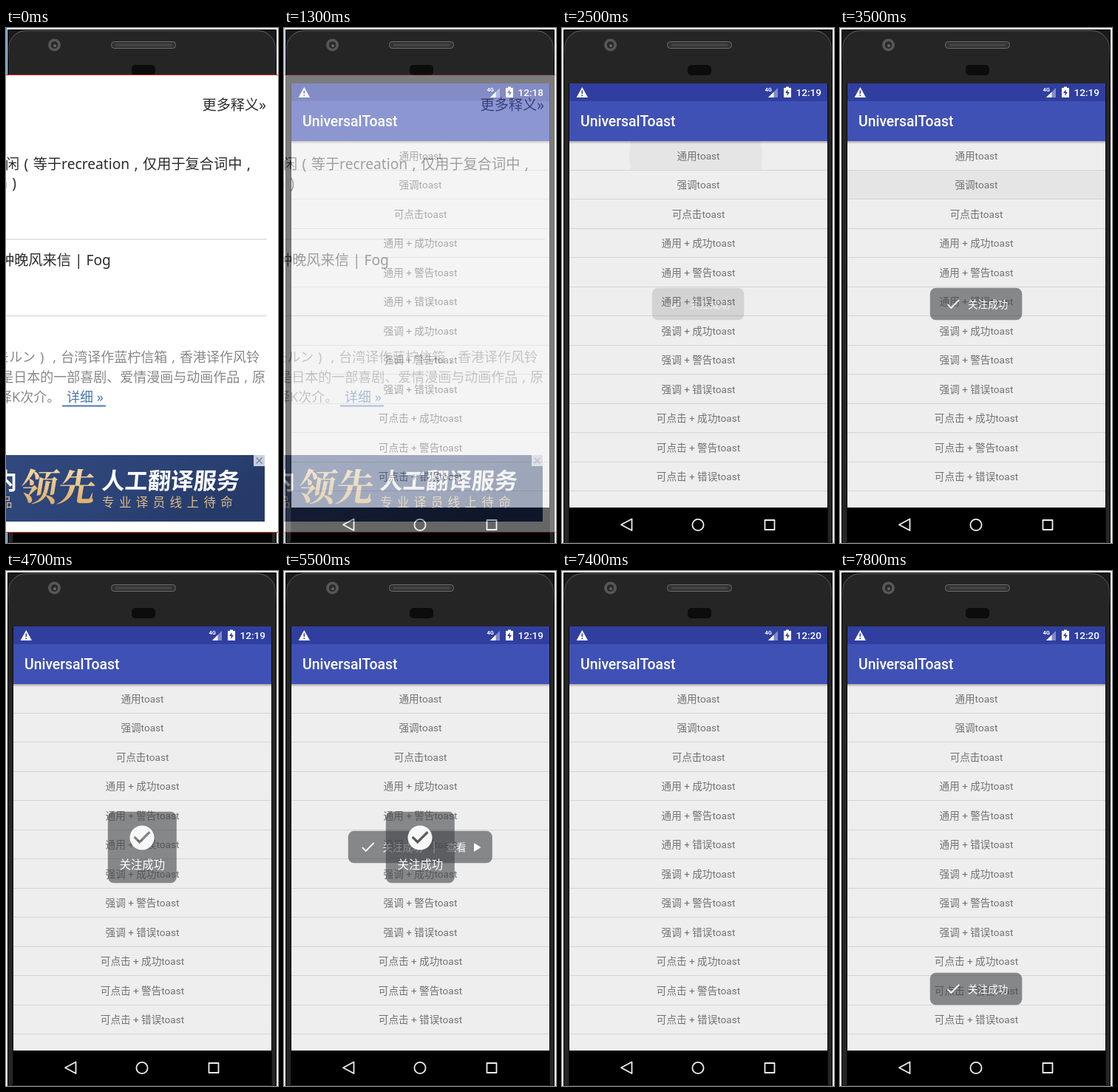
Write an HTML page that moves like this. It is 368x697 px and loops after 8 s.

```html
<!DOCTYPE html>
<html lang="zh-CN">
<head>
<meta charset="utf-8">
<title>UniversalToast</title>
<style>
  html, body { margin: 0; width: 100%; height: 100%; overflow: hidden; background: #f2f2f2; }
  svg { display: block; width: 368px; height: 697px; font: 13.6px Roboto, "Noto Sans CJK SC", "Noto Sans CJK", sans-serif; }
  text { white-space: pre; }
  .title { font-size: 19.4px; font-weight: 500; }
  .clock { font-weight: 500; text-anchor: end; }
  .network { font-size: 7.5px; font-weight: 700; }
  .large { font-size: 15.4px; }
  #rows { fill: #727272; text-anchor: middle; }
  .toast { fill: #fff; }
  .panel { fill: #424346; fill-opacity: .6; }
  .page { font: 19.2px "Noto Sans", "Noto Sans CJK SC", "Noto Sans CJK", sans-serif; fill: #2b2b2b; }
  .note { font-size: 18px; fill: #888; }
  .link { fill: #4878b4; }
  .end { text-anchor: end; }
  .banner { fill: #fff; font-weight: 700; font-size: 31px; }
  .gold { fill: #dcbc88; font-size: 16.5px; font-weight: 500; letter-spacing: 6.4px; }
  .brush { font: 900 51px "Noto Serif CJK SC", "Noto Sans CJK SC", "Noto Sans CJK", serif; }
</style>
</head>
<body>
<svg viewBox="0 0 368 697">
  <defs>
    <linearGradient id="navy" x2="1" y2=".4">
      <stop stop-color="#31497f"/><stop offset=".6" stop-color="#2c4377"/><stop offset="1" stop-color="#253a68"/>
    </linearGradient>
    <linearGradient id="gold" x2="0" y2="1">
      <stop stop-color="#fbe6b8"/><stop offset="1" stop-color="#d9a55c"/>
    </linearGradient>
    <linearGradient id="shade" x2="0" y2="1">
      <stop stop-opacity=".3"/><stop offset="1" stop-opacity="0"/>
    </linearGradient>
    <linearGradient id="rim" x2="0" y2=".06">
      <stop stop-color="#666"/><stop offset="1" stop-color="#2a2929"/>
    </linearGradient>
    <clipPath id="firstRow"><rect x="10" y="153" width="349" height="39"/></clipPath>
    <path id="check" d="M9 16.17 4.83 12l-1.42 1.41L9 19 21 7l-1.41-1.41z"/>
    <g id="simpleToast">
      <rect class="panel" x="121.8" y="351.8" width="124.500" height="43.500" rx="8"/>
      <use href="#check" transform="translate(141.6 361.8) scale(.97)"/>
      <text x="173" y="379">关注成功</text>
    </g>
  </defs>

  <g class="phone">
    <rect x="2.5" y="2.5" width="363" height="694" fill="#191919" stroke="#000"/>
    <rect x="3.5" y="3.5" width="361" height="720" rx="24" fill="#262525" stroke="url(#rim)"/>
    <path d="M9.5 75V697M359.5 75V697" stroke="#0c0c0c"/>
    <circle cx="65.5" cy="23" r="8.5" fill="#555"/>
    <circle cx="65.5" cy="23" r="5.5" fill="#2a2a2a" stroke="#666"/>
    <circle cx="66" cy="24" r="2" fill="#666"/>
    <rect x="142.500" y="18.500" width="87" height="9" rx="4" fill="#343333" stroke="#6d6c6c"/>
    <path d="M148 23h76" stroke="#484747" stroke-width="3"/>
    <rect x="170" y="50" width="32" height="14" rx="5" fill="#0d0c0c"/>
  </g>

  <g class="app">
    <rect x="10" y="75" width="349" height="24" fill="#303f9f"/>
    <rect x="10" y="99" width="349" height="54" fill="#3f51b5"/>
    <rect x="10" y="153" width="349" height="496" fill="#eee"/>
    <rect id="press" x="10" y="193" width="349" height="38.5" fill="#e5e5e5"/>
    <circle id="ripple" cx="181" cy="173" clip-path="url(#firstRow)"/>
    <rect x="10" y="153" width="349" height="4" fill="url(#shade)"/>
    <g id="rows"></g>
    <text class="title" x="25" y="133" fill="#fff">UniversalToast</text>

    <g fill="#fff">
      <path fill-rule="evenodd" d="M27.3 80 35 94H19.6zM26.5 84.5V89h1.6v-4.5zm0 5.7v1.7h1.6v-1.7z"/>
      <text class="network" x="274.5" y="86">4G</text>
      <path d="M292 81v13h-13z" opacity=".4"/>
      <path d="M286.5 86.5V94H279z"/>
      <path fill-rule="evenodd" d="M300 81h3v-1.5h4V81h3v13h-10zM305.5 83l-3.5 5h2.5v4l3.5-5.2h-2.5z"/>
      <text class="clock" id="clock" x="351" y="92"></text>
    </g>

    <rect x="10" y="649" width="349" height="47" fill="#000"/>
    <g fill="none" stroke="#eee" stroke-width="1.8" stroke-linejoin="round">
      <path d="M94.500 664.500v15.500L80 672.200z"/>
      <circle cx="184" cy="672.5" r="7.600"/>
      <rect x="274.5" y="666" width="13" height="13"/>
    </g>

    <use class="toast" id="plain" href="#simpleToast"/>
    <g class="toast" id="clickable">
      <rect class="panel" x="86.800" y="351.800" width="195" height="43.500" rx="8"/>
      <use href="#check" transform="translate(102 361.8) scale(.97)"/>
      <text x="133.5" y="379">关注成功</text>
      <rect x="202.5" y="366" width="1.2" height="16"/>
      <text x="219.5" y="379">查看</text>
      <path d="M257 368v12l9.500-6z"/>
    </g>
    <g class="toast" id="strong">
      <rect class="panel" x="137.800" y="325.800" width="93" height="96.500" rx="8"/>
      <path fill="#f8f8f8" transform="translate(164.2 341.2) scale(1.65)" d="M12 2a10 10 0 1 0 0 20 10 10 0 1 0 0-20zm-2 15-5-5 1.41-1.41L10 14.17l7.59-7.59L19 8z"/>
      <text class="large" x="153.5" y="402.5">关注成功</text>
    </g>
    <use class="toast" id="low" href="#simpleToast" y="192"/>
  </g>

  <g class="page" id="page">
    <rect width="1" height="697" fill="#4a7aa8"/>
    <rect y="63" width="368" height="620" fill="#fff"/>
    <path d="M0 63.5H368M0 682.5H368" stroke="#c8322f"/>
    <text class="end" x="352" y="111">更多释义»</text>
    <text x="-1" y="191">闲&#8196;(&#8196;等于recreation&#8196;,&#8196;仅用于复合词中&#8196;,</text>
    <text x="-10" y="217">n&#8196;)</text>
    <path d="M0 286H353M0 389.5H353" stroke="#e3e3e3" stroke-width="2"/>
    <text x="-8" y="321">种晚风来信 | Fog</text>
    <text class="note end" x="343" y="452">モルン&#8196;)&#8196;&#8196;,&#8196;台湾译作蓝柠信箱&#8196;,&#8196;香港译作风铃</text>
    <text class="note end" x="351" y="479">是日本的一部喜剧、爱情漫画与动画作品&#8196;,&#8196;原</text>
    <text class="note" x="-10" y="506">译K次介。</text>
    <text class="note link" x="82" y="506">详细 »</text>
    <path d="M76 511.5h59" stroke="#4878b4" stroke-width="2"/>
    <g class="banner">
      <rect y="578" width="350" height="90" fill="url(#navy)"/>
      <text x="-16" y="624">内</text>
      <text class="gold" x="-8" y="648">品</text>
      <text class="brush" fill="url(#gold)" transform="translate(17 640) skewX(-9)">领先</text>
      <text transform="translate(129 624) skewX(-5)">人工翻译服务</text>
      <text class="gold" x="130" y="648">专业译员线上待命</text>
      <rect x="335" y="578" width="15" height="15" fill="#c9d0de"/>
      <path d="M338.5 581.5l8 8m0-8-8 8" stroke="#7484a4" stroke-width="1.5"/>
    </g>
  </g>
</svg>
<script>
const LOOP = 8000, STEP = 100, ROW = 39.47;
const el = id => document.getElementById(id);

const kinds = ['通用', '强调', '可点击'];
const states = ['成功', '警告', '错误'];
const labels = [...kinds, ...kinds.flatMap(kind => states.map(state => `${kind} + ${state}`))];

el('rows').innerHTML = labels.map((label, i) => `
  <text x="184.5" y="${178 + i * ROW}">${label}toast</text>
  <rect x="10" y="${Math.round(192 + i * ROW)}" width="349" height="1" fill="#d4d4d4"/>`).join('');

const ramp = (t, from, to) => Math.min(1, Math.max(0, (t - from) / (to - from)));
const show = (id, opacity) => el(id).setAttribute('opacity', opacity);
const fade = (id, t, inStart, outStart, outEnd) =>
  show(id, ramp(t, inStart, inStart + 400) * (1 - ramp(t, outStart, outEnd)));

function draw(t) {
  show('page', t < 1300 ? 1 : t < 1400 ? 0.4 : 0);
  el('clock').textContent = t < 1800 ? '12:18' : t < 7400 ? '12:19' : '12:20';

  el('ripple').setAttribute('r', 135 * ramp(t, 2300, 2600));
  show('ripple', 0.04 * (1 - ramp(t, 2500, 2800)));
  show('press', t < 3500 ? 0 : 1 - ramp(t, 4300, 4700));

  fade('plain', t, 2400, 4300, 4700);
  fade('strong', t, 4300, 6200, 6500);
  fade('clickable', t, 5100, 6950, 7350);
  fade('low', t, 7400, LOOP, LOOP + 400);
}

const start = performance.now();
function tick() {
  const t = (performance.now() - start) % LOOP;
  draw(Math.floor(t / STEP) * STEP);
  requestAnimationFrame(tick);
}
tick();
</script>
</body>
</html>
```
